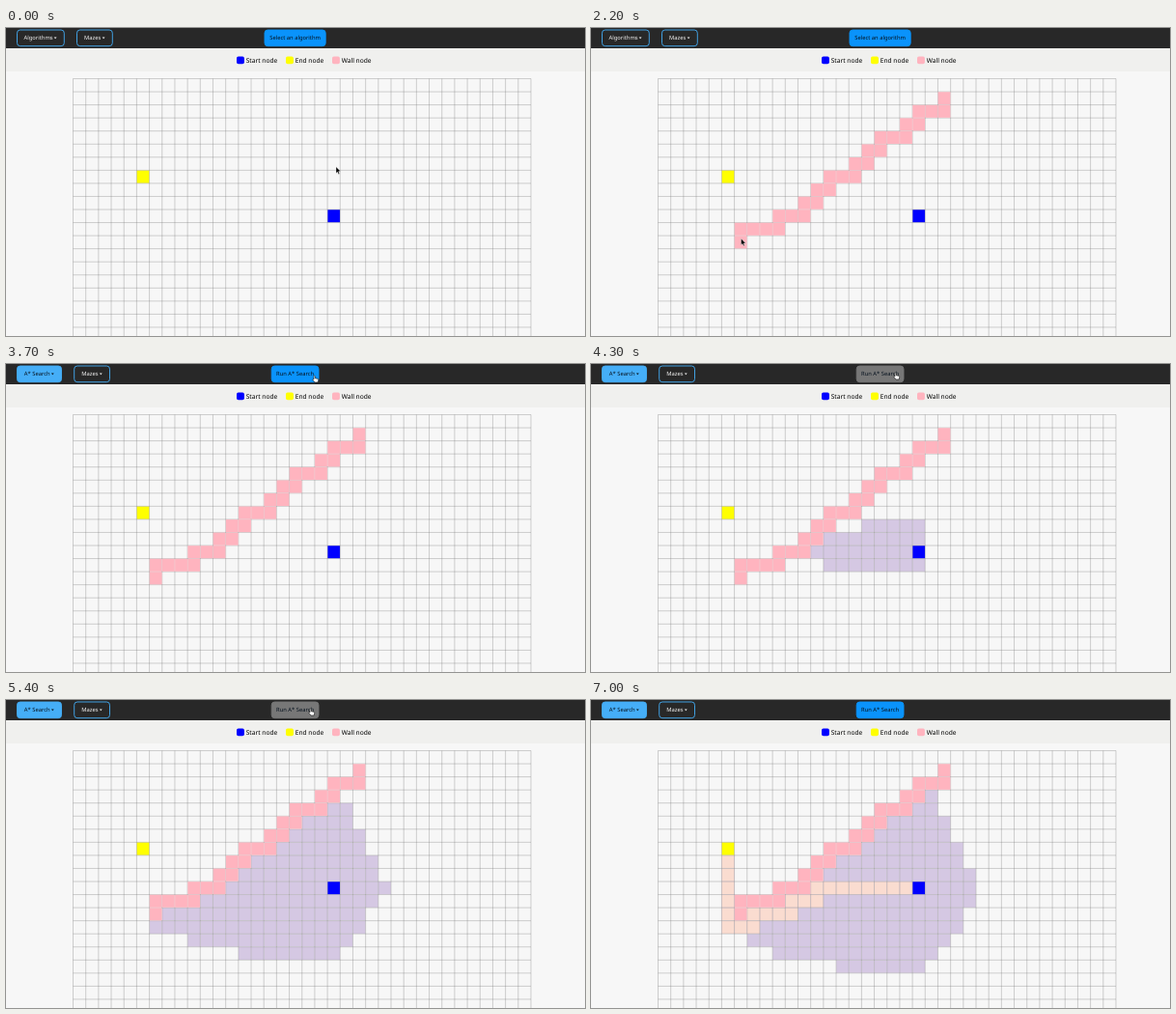
An HTML page for the animation above (7200 ms loop, 600x319 px).

```html
<!DOCTYPE html>
<html lang="en">
<head>
<meta charset="utf-8">
<title>Pathfinding visualizer</title>
<style>
  html, body { margin: 0; width: 100%; height: 100%; overflow: hidden; background: #f7f7f7; }
  svg { display: block; width: 100%; height: 100%; }
  text { font-family: "Noto Sans", "Open Sans", sans-serif; font-size: 5.8px; text-rendering: geometricPrecision; }
  .legend { font-size: 6.65px; fill: #000; }
  .menu { font-weight: 600; fill: #0a1a28; }
</style>
</head>
<body>
<svg id="stage" viewBox="0 0 600 319"></svg>
<script>
const LOOP = 7200, STEP = 100;
const LEFT = 69.5, TOP = 52.5, CW = 13.18, CH = 13.55, COLS = 36, ROWS = 20;
const START = [20, 10], END = [5, 7];
const SKY = '#45aef7', BLUE = '#0a93fb', INK = '#06121e', PINK = '#ffb4bf';
const stage = document.getElementById('stage');

function add(tag, attrs, parent = stage, label) {
  const node = document.createElementNS(stage.namespaceURI, tag);
  for (const key in attrs) node.setAttribute(key, attrs[key]);
  if (label) node.textContent = label;
  parent.append(node);
  return node;
}
const box = (x, y, width, height, fill, rx = 0, parent = stage) =>
  add('rect', { x, y, width, height, fill, rx }, parent);
const show = (node, on) => node.setAttribute('visibility', on ? 'visible' : 'hidden');
const within = (t, a, b) => t >= a && t < b;
const colX = c => LEFT + c * CW;
const rowY = r => TOP + r * CH;
const cell = ([c, r], fill, parent) =>
  box(colX(c) + .2, rowY(r) + .2, CW - .4, CH - .5, fill, 0, parent);

// Hand-drawn wall: a sloping staircase with a flat tail.
function drawWall() {
  const cells = [[22, 1]];
  const goTo = (toC, toR) => {
    let [c, r] = cells.at(-1);
    while (c !== toC || r !== toR) {
      c += Math.sign(toC - c);
      r += Math.sign(toR - r);
      cells.push([c, r]);
    }
  };
  for (let r = 1; r <= 11; r++) {
    const turn = r < 11 ? Math.round(23.05 - 1.39 * r) : 6;
    goTo(turn, r);
    goTo(turn, r + 1);
  }
  return cells;
}

// A* with a straight-line estimate; cells are visited in order of total cost.
function search(wall) {
  const blocked = new Set(wall.map(String));
  const steps = new Map([[String(START), 0]]);
  const neighbours = ([c, r]) => [[c, r - 1], [c + 1, r], [c, r + 1], [c - 1, r]];
  const queue = [START];
  for (const p of queue) {
    for (const q of neighbours(p)) {
      const inside = within(q[0], 0, COLS) && within(q[1], 0, ROWS);
      if (!inside || blocked.has(String(q)) || steps.has(String(q))) continue;
      steps.set(String(q), steps.get(String(p)) + 1);
      queue.push(q);
    }
  }
  const depth = p => steps.get(String(p));
  const cost = p => depth(p) + Math.hypot(p[0] - END[0], p[1] - END[1]);
  const limit = depth(END) + 1;
  const visited = queue
    .filter(p => cost(p) <= limit && String(p) !== String(END))
    .sort((a, b) => cost(a) - cost(b));

  const path = [];
  for (let p = END; depth(p) > 1;) {
    p = neighbours(p).find(q => depth(q) === depth(p) - 1);
    path.unshift(p);
  }
  return { visited, path };
}

const timed = [];
const reveal = (cells, fill, parent, begin, gap) => cells.forEach((p, i) =>
  timed.push({ node: cell(p, fill, parent), at: begin + i * gap }));

// Board
const WALL_BEGIN = 830, WALL_GAP = 50;
const wall = drawWall();
const { visited, path } = search(wall);
const floor = add('g', {});
reveal(visited, '#d5c8e3', floor, 3950, 12);
reveal(path, '#fadcd0', floor, 5750, 28);
cell(END, '#ffff00', floor);
cell(START, '#0000ff', floor);
let lines = '';
for (let c = 0; c <= COLS; c++) lines += `M${colX(c)} ${TOP}V${rowY(ROWS)}`;
for (let r = 0; r <= ROWS; r++) lines += `M${LEFT} ${rowY(r)}H${colX(COLS)}`;
add('path', { d: lines, stroke: '#666', 'stroke-opacity': .37, 'stroke-width': .8, fill: 'none' });
reveal(wall, PINK, add('g', {}), WALL_BEGIN, WALL_GAP);

// Legend
box(0, 21, 600, 24, '#f0f0ee');
[[239, '#0000ff', 'Start node'], [290, '#ffff00', 'End node'], [338, PINK, 'Wall node']].forEach(([x, color, label]) => {
  box(x, 29.5, 7.9, 7.8, color, 1.8);
  add('text', { x: x + 9.7, y: 36, class: 'legend' }, stage, label);
});

// Toolbar
box(0, 0, 600, 21, '#282828');
function button(x, width, label, { fill = 'none', stroke = SKY, ink = '#f4f4f4', caret = false } = {}) {
  const group = add('g', {});
  const face = add('rect', { x, y: 2, width, height: 16.7, rx: 3.2, fill, stroke, 'stroke-width': .9 }, group);
  add('text', { x: x + width / 2 - (caret ? 2.3 : 0), y: 12.3, 'text-anchor': 'middle', fill: ink }, group, label);
  if (caret) add('path', { d: `M${x + width - 10.6} 9.6h2.8l-1.4 1.6z`, fill: ink }, group);
  return { group, face };
}
const drop = { caret: true }, dropLit = { caret: true, fill: SKY, ink: INK };
const action = { fill: BLUE, stroke: BLUE, ink: INK };
const idle = button(11.5, 48.8, 'Algorithms', drop);
const lit = button(11.5, 48.8, 'Algorithms', dropLit);
const picked = button(11.5, 46, 'A* Search', dropLit);
const mazes = button(73.5, 36.8, 'Mazes', drop);
const choose = button(268, 63.2, 'Select an algorithm', action);
const run = button(275.2, 48.8, 'Run A* Search', action);

// Menu
const menu = add('g', {});
box(8, 23, 56, 92, SKY, 3.6, menu);
let baseline = 36;
for (const item of ['A* Search', "Dijkstra's|Algorithm", 'Greedy Best-|first Search', 'Breadth-first|Search']) {
  for (const line of item.split('|')) {
    add('text', { x: 12, y: baseline, class: 'menu' }, menu, line);
    baseline += 8;
  }
  baseline += 7.3;
}

// Pointer
const arrow = add('path', { d: 'M0 0V6.7L1.5 5.3L2.6 7.7L3.7 7.2L2.7 4.9H4.8Z', fill: '#000', stroke: '#fff', 'stroke-width': .4 });
const hand = add('path', {
  d: 'M0 .6Q.7-.4 1.3.6V2.8L4 3.3Q4.8 3.5 4.7 4.4L4.2 7H1L-1.2 4.3Q-1 3.3 0 4Z',
  fill: '#fff', stroke: '#111', 'stroke-width': .6
});
const overCell = ([c, r]) => [colX(c) + 6.9, rowY(r) + 3];
const WALL_END = WALL_BEGIN + wall.length * WALL_GAP;
const moves = [
  { at: 0, to: [342, 143.7] },
  { at: 200, to: [355, 125] },
  { at: 350, to: [355, 125] },
  { at: WALL_BEGIN, to: overCell(wall[0]) },
  { at: WALL_END, to: overCell(wall.at(-1)) },
  { at: 2750, to: [35, 12] },
  { at: 3000, to: [31, 20.5] },
  { at: 3250, to: [29, 33] },
  { at: 3650, to: [319, 12] },
  { at: 3750, to: [319, 12] },
  { at: 3900, to: [315, 9] },
  { at: 6000, to: [315, 9] },
  { at: 6300, to: [445, -10] }
];
function pointerAt(t) {
  if (within(t, WALL_BEGIN, WALL_END)) return overCell(wall[Math.floor((t - WALL_BEGIN) / WALL_GAP)]);
  const next = moves.findIndex(move => move.at > t);
  if (next < 0) return moves.at(-1).to;
  const from = moves[next - 1], goal = moves[next];
  const k = (t - from.at) / (goal.at - from.at);
  const eased = k * k * (3 - 2 * k);
  return from.to.map((v, i) => v + (goal.to[i] - v) * eased);
}

function render(now) {
  const t = Math.floor(now % LOOP / STEP) * STEP;
  for (const { node, at } of timed) show(node, t >= at);

  const chosen = t >= 3300;
  show(idle.group, t < 2700);
  show(lit.group, within(t, 2700, 3300));
  show(picked.group, chosen);
  show(choose.group, !chosen);
  show(run.group, chosen);
  show(menu, within(t, 2800, 3300));
  mazes.group.setAttribute('transform', `translate(${chosen ? -2.8 : 0})`);
  const color = within(t, 3900, 6400) ? '#777' : BLUE;
  run.face.setAttribute('fill', color);
  run.face.setAttribute('stroke', color);

  const [x, y] = pointerAt(t);
  const clicking = within(t, 2700, 2900) || within(t, 3100, 3400) || within(t, 3600, 6100);
  for (const node of [arrow, hand]) node.setAttribute('transform', `translate(${x} ${y})`);
  show(arrow, !clicking);
  show(hand, clicking);
}

const began = performance.now();
function tick() {
  render(performance.now() - began);
  requestAnimationFrame(tick);
}
tick();
</script>
</body>
</html>
```
